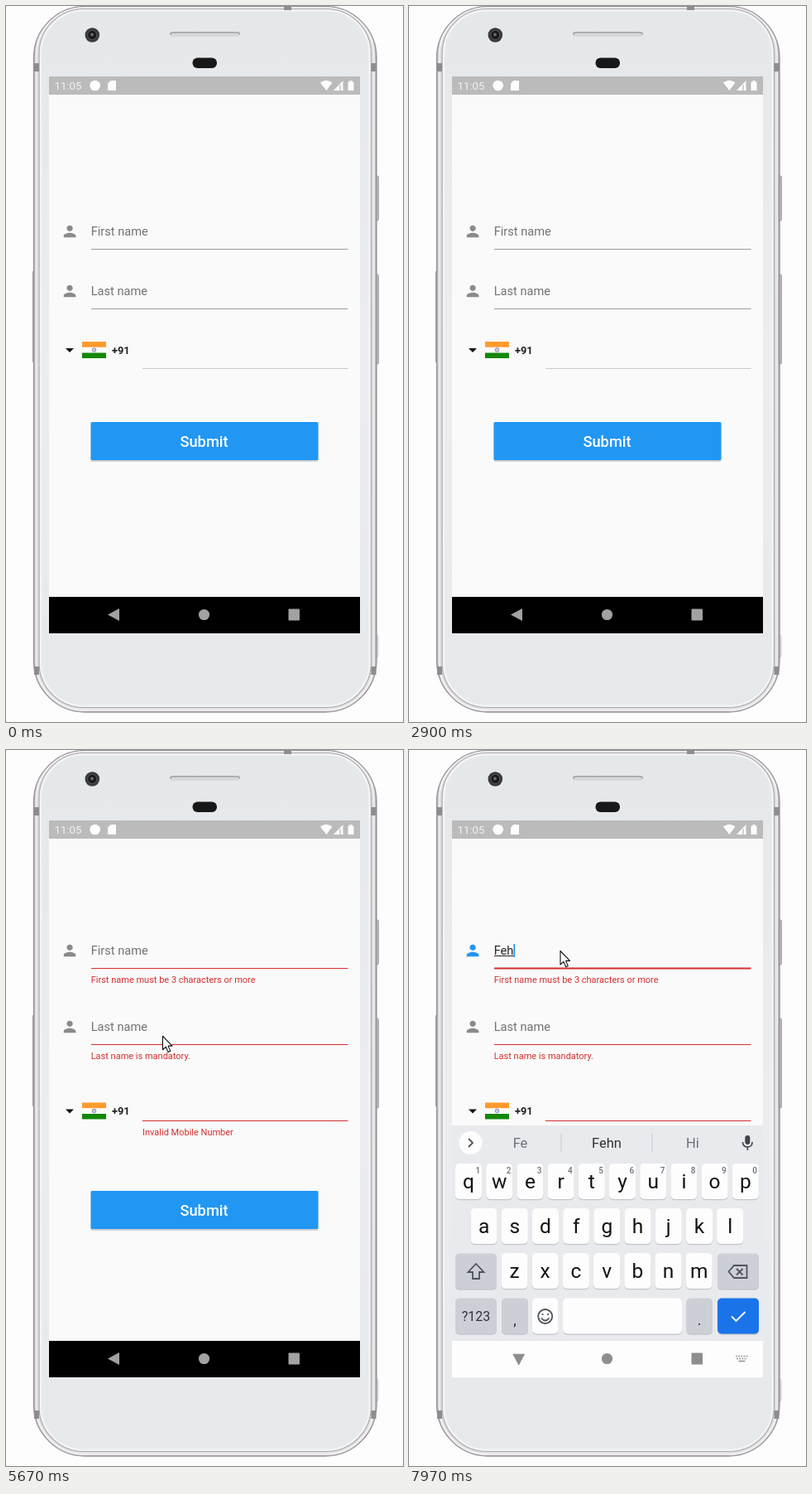
Animation, 480 px wide and 864 px high, one loop 8000 ms. Source, as an HTML page:

```html
<!DOCTYPE html>
<html lang="en">
<head>
<meta charset="utf-8">
<title>Form validation</title>
<style>
html, body { margin: 0; width: 100%; height: 100%; overflow: hidden; background: #fdfdfd; }
svg { display: block; width: 100vw; height: 100vh; }
text { font-family: Roboto, sans-serif; white-space: pre; }
.hint { font-size: 14.6px; fill: #727272; }
.error { font-size: 11px; fill: #d32f2f; }
.key { font-size: 24.5px; fill: #121212; text-anchor: middle; }
.word { font-size: 16.5px; text-anchor: middle; }
.line { fill: none; stroke: #50545a; stroke-width: 1.8; }
</style>
</head>
<body>
<svg viewBox="0 0 480 864" preserveAspectRatio="none">
  <defs>
    <linearGradient id="rim">
      <stop offset="0" stop-color="#b9b6b9"/><stop offset=".012" stop-color="#e2dfe2"/>
      <stop offset=".988" stop-color="#e2dfe2"/><stop offset="1" stop-color="#b0adb0"/>
    </linearGradient>
    <linearGradient id="body" x2="0" y2="1">
      <stop offset="0" stop-color="#e5e8eb"/><stop offset=".5" stop-color="#ebedf0"/>
      <stop offset="1" stop-color="#e6e9ec"/>
    </linearGradient>
    <clipPath id="screen"><rect x="52" y="107" width="376" height="606"/></clipPath>
    <path id="person" d="M12 12c2.21 0 4-1.79 4-4s-1.79-4-4-4-4 1.79-4 4 1.79 4 4 4zm0 2c-2.67 0-8 1.34-8 4v2h16v-2c0-2.66-5.33-4-8-4z"/>
  </defs>

  <!-- phone -->
  <g fill="#c2bfc2" stroke="#989598" stroke-width=".8">
    <rect x="446" y="205" width="4.5" height="54" rx="1.5"/>
    <rect x="446" y="324" width="4.5" height="108" rx="1.5"/>
    <rect x="446" y="759" width="4" height="27" rx="1.5" fill="#e4e2e4" stroke="#cdcacd"/>
    <rect x="32.3" y="320" width="3" height="110" rx="1"/>
  </g>
  <rect x="33.5" y=".5" width="414.5" height="851.5" rx="62" fill="url(#rim)" stroke="#949194" stroke-width="1.3"/>
  <rect x="36.5" y="2" width="408.5" height="847.5" rx="58" fill="none" stroke="#f4f2f4" stroke-width="1.6"/>
  <rect x="40" y="3.5" width="401.5" height="843" rx="54" fill="url(#body)" stroke="#aeabae" stroke-width="1.2"/>
  <rect x="42" y="5.5" width="397.5" height="839" rx="52" fill="none" stroke="#f3f4f6" stroke-width="2"/>
  <g fill="#8e8c8e">
    <rect x="34" y="69" width="6" height="10"/><rect x="441.5" y="69" width="6" height="10"/>
    <rect x="34" y="797" width="6" height="10"/><rect x="441.5" y="797" width="6" height="10"/>
    <rect x="336" y="0" width="9" height="5"/>
  </g>
  <circle cx="104.3" cy="35" r="8.8" fill="#3a3a3c"/>
  <circle cx="104.3" cy="35" r="5.5" fill="#18181a" stroke="#565658"/>
  <circle cx="104" cy="34.5" r="2" fill="#6a6a6c"/>
  <rect x="198.5" y="31" width="83.5" height="6" rx="3" fill="#d6d8da"/>
  <path d="M199 35V33.5Q199 32 201 32H280Q282 32 282 33.5V35" fill="none" stroke="#a2a2a4" stroke-width="1.5"/>
  <rect x="225.5" y="62.5" width="29.5" height="12.5" rx="6" fill="#181818"/>

  <!-- screen -->
  <rect x="52" y="85" width="376" height="628" fill="#fafafa"/>
  <rect x="52" y="85" width="376" height="22" fill="#bbbbbb"/>
  <text x="58.5" y="101" font-size="13.2" fill="#f2f2f2">11:05</text>
  <g fill="#fdfdfd">
    <circle cx="107.7" cy="96" r="6.3"/>
    <path d="M126.5 90H133V102H123V93.5Z"/>
    <path d="M380 92.5Q387.3 87 394.5 92.5L387.3 102Z"/>
    <path d="M396 102L407.5 90V102Z"/>
    <path d="M413.5 91.5H415.5V90H418.5V91.5H420.5V102H413.5Z"/>
  </g>
  <path d="M404 95V102" stroke="#bbb" stroke-width="1.2"/>

  <g clip-path="url(#screen)">
    <g id="form"></g>
    <g id="keyboard"></g>
  </g>

  <!-- navigation bar -->
  <rect x="52" y="713" width="376" height="44" fill="#000"/>
  <rect id="lightNav" x="52" y="713" width="376" height="44" fill="#fdfdfd"/>
  <g id="nav">
    <path id="back" d="M-9 .7L5 -6.8V8.2Z"/>
    <circle cx="239.5" cy="734.5" r="6.6"/>
    <rect x="341.5" y="727.5" width="13.5" height="14" rx="1"/>
  </g>
  <g id="imeIcon" fill="none" stroke-width="1.5">
    <path d="M395 731.5H410M396 734.5H409" stroke-dasharray="1.8 1.4"/><path d="M398.5 737.5H406.5"/>
  </g>
  <path id="mouse" d="M0 0V16.5L3.9 12.9L6.7 19.3L9.3 18.1L6.6 11.9H11.5Z" fill="#fff" stroke="#111" stroke-width="1.1" stroke-linejoin="round"/>
</svg>
<script>
const LOOP = 8000, SHOW_MOUSE = 4350, SUBMIT = 4580, FOCUS = 6380, KEYS_UP = 6680;
const TYPED = [7420, 7630, 7830], NAME = 'Feh';
const BLUE = '#2196f3', RED = '#d32f2f', GRAY = '#8a8a8a';

const $ = id => document.getElementById(id);
const clamp = v => Math.max(0, Math.min(1, v));
const ramp = (t, start, length) => clamp((t - start) / length);
const smooth = p => p * p * (3 - 2 * p);
const mix = (a, b, p) => a + (b - a) * p;
const show = (id, on) => $(id).setAttribute('visibility', on ? 'inherit' : 'hidden');
const shift = (id, x, y) => $(id).setAttribute('transform', `translate(${x} ${y})`);
const paint = (id, attrs) => Object.entries(attrs).forEach(([k, v]) => $(id).setAttribute(k, v));

// Form
const nameRow = (n, label, error) => `
  <g id="row${n}">
    <use id="icon${n}" href="#person" transform="translate(66.1 -11) scale(.914)"/>
    <text id="hint${n}" class="hint" x="102.7" y="4.8">${label}</text>
    <path id="line${n}" d="M103 21.5H413.5"/>
    <text id="error${n}" class="error" x="102.7">${error}</text>
  </g>`;
$('form').innerHTML =
  nameRow(1, 'First name', 'First name must be 3 characters or more') +
  nameRow(2, 'Last name', 'Last name is mandatory.') + `
  <g id="phone">
    <path d="M72 -2H82L77 3Z" fill="#111"/>
    <rect x="92" y="-10" width="29" height="20" fill="#fdfdfd"/>
    <rect x="92" y="-10" width="29" height="6.7" fill="#ff9a2e"/>
    <rect x="92" y="3.5" width="29" height="6.5" fill="#138808"/>
    <circle cx="106.5" cy="0" r="2.3" fill="#d0d0e0" stroke="#7777a4" stroke-width=".8"/>
    <text x="128" y="4.6" font-size="12.8" font-weight="700" fill="#202020">+91</text>
  </g>
  <path id="line3" d="M165 0H413.5"/>
  <text id="error3" class="error" x="165">Invalid Mobile Number</text>
  <g id="submit">
    <rect x="102.5" y="1.5" width="275" height="46.5" rx="2" fill="#cfcfcf"/>
    <rect x="102.5" y="0" width="275" height="46" rx="1.5" fill="${BLUE}"/>
    <text x="239.5" y="29.5" font-size="18.3" font-weight="500" fill="#fff" text-anchor="middle">Submit</text>
  </g>
  <text id="typed" class="hint" x="102.7" y="246.8" style="fill:#222"></text>
  <path id="composing" stroke="#222"/>
  <rect id="caret" y="234" width="1.8" height="16" fill="${BLUE}"/>`;

// Keyboard
const PITCH = 37.2;
const LIGHT = '#fdfdfd', DARK = '#cccfd5', INK = '#303236', SOFT = '#6c7076';
const box = (x, y, w, fill) =>
  `<rect x="${x}" y="${y + 1.2}" width="${w}" height="43" rx="5" fill="#c2c5ca"/>
   <rect x="${x}" y="${y}" width="${w}" height="43" rx="5" fill="${fill}"/>`;
const letters = (chars, x0, y) => [...chars].map((c, i) => {
  const x = x0 + i * PITCH;
  return box(x - 16, y, 32, LIGHT) + `<text class="key" x="${x}" y="${y + 30}">${c}</text>`;
}).join('');
const digits = [...'1234567890'].map((d, i) =>
  `<text x="${83.3 + i * PITCH}" y="511" font-size="10" font-weight="500" fill="${SOFT}" text-anchor="middle">${d}</text>`).join('');
const chevron = d => `<circle cx="74.5" cy="474" r="14" fill="${LIGHT}"/><path class="line" d="${d}"/>`;
const bar = x => `<path d="M${x} 463V485" stroke="#cccfd3" stroke-width="1.2"/>`;
const word = (x, s, fill) => `<text class="word" x="${x}" y="480" fill="${fill}">${s}</text>`;

$('keyboard').innerHTML = `
  <rect x="52" y="453" width="376" height="260" fill="#e8eaed"/>
  <g id="tools">
    ${chevron('M77 469L72 474L77 479')}
    <circle class="line" cx="122.5" cy="472" r="5"/><path class="line" d="M126 475.5L132 481.5"/>
    <path class="line" d="M173 467H186V475L180.5 481H173Q172 481 172 480V468Q172 467 173 467ZM186 475H180.5V481M175.5 474Q177 477 179.5 476M176 470.5V471.5M181.5 470.5V471.5"/>
    <text x="233" y="478.5" font-size="12.5" font-weight="900" letter-spacing=".6" fill="#50545a" text-anchor="middle">GIF</text>
    <path class="line" d="M282 467.5H294.5V482H282ZM285 471.5H291.5M285 475H291.5M285 478.5H289.5"/>
    <rect x="285" y="465" width="6.5" height="4" fill="#50545a"/>
    ${bar(321.5)}
    <path d="M349.5 474h0M355 474h0M360.5 474h0" stroke="#50545a" stroke-width="3.6" stroke-linecap="round"/>
  </g>
  <g id="words">
    ${chevron('M72 469L77 474L72 479')}
    ${word(134.5, 'Fe', SOFT)}${bar(184)}${word(239, 'Fehn', INK)}${bar(294)}${word(343, 'Hi', SOFT)}
  </g>
  <rect x="406.3" y="465" width="6" height="11" rx="3" fill="#404348"/>
  <path class="line" d="M403.5 473Q403.5 479 409.3 479T415 473M409.3 479V483"/>
  ${letters('qwertyuiop', 72, 499)}${digits}
  ${letters('asdfghjkl', 90.6, 553)}
  ${box(56, 607.5, 50, DARK)}${letters('zxcvbnm', 127.5, 607)}${box(373, 607.5, 50, DARK)}
  <path class="line" d="M81 620L90.5 630H85V638H77V630H71.5Z"/>
  <path class="line" d="M393 622H408.5V637H393L386.5 629.5ZM396 626L403.5 633.5M403.5 626L396 633.5"/>
  ${box(56, 661.5, 50, DARK)}${box(112, 661.5, 32, DARK)}${box(149, 661.5, 31.5, LIGHT)}
  ${box(186, 661.5, 144, LIGHT)}${box(335.5, 661.5, 31.5, DARK)}${box(373, 661.5, 50, '#1a73e8')}
  <text x="81" y="689" font-size="16" fill="${INK}" text-anchor="middle">?123</text>
  <text x="128" y="694" font-size="18" fill="${INK}" text-anchor="middle">,</text>
  <text x="351" y="694" font-size="18" fill="${INK}" text-anchor="middle">.</text>
  <circle class="line" cx="164.7" cy="683.5" r="8.5"/>
  <path class="line" d="M161.5 680V682M168 680V682M160 685.5Q164.7 691.5 169.5 685.5"/>
  <path d="M390 683.5L395.5 689L406.5 678" fill="none" stroke="#fff" stroke-width="1.9"/>`;

function drawForm(t) {
  const invalid = t >= SUBMIT, focused = t >= FOCUS;
  shift('row1', 0, invalid ? 242 : 272);
  shift('row2', 0, invalid ? 334 : 344);
  shift('phone', 0, invalid ? 435.5 : 415);
  shift('line3', 0, invalid ? 447.5 : 437.5);
  shift('submit', 0, invalid ? 532 : 502);

  const line = invalid ? RED : '#9c9c9c';
  paint('line1', { stroke: line, 'stroke-width': focused ? 1.8 : 1 });
  paint('line2', { stroke: line, 'stroke-width': 1 });
  paint('line3', { stroke: invalid ? line : '#c8c8c8', 'stroke-width': 1 });
  paint('icon1', { fill: focused ? BLUE : GRAY });
  paint('icon2', { fill: GRAY });

  const fade = smooth(ramp(t, SUBMIT, 167));
  const drop = mix(-3, 0, fade);
  paint('error1', { opacity: fade, y: 39 + drop });
  paint('error2', { opacity: fade, y: 39 + drop });
  paint('error3', { opacity: fade, y: 465 + drop });
}

function drawTyping(t) {
  const count = TYPED.filter(at => t >= at).length;
  $('typed').textContent = NAME.slice(0, count);
  show('hint1', !count);
  const width = count ? $('typed').getComputedTextLength() : 0;
  paint('composing', { d: `M103 248.5H${103 + width}` });
  show('composing', count > 0);

  const since = t - (count ? TYPED[count - 1] : FOCUS);
  paint('caret', { x: 102.7 + width });
  show('caret', t >= FOCUS && since % 1000 < 500);
  show('tools', !count);
  show('words', count > 0);
}

function drawKeyboard(t) {
  const up = ramp(t, KEYS_UP, 230), eased = 1 - (1 - up) ** 3;
  shift('keyboard', 0, 260 * (1 - eased));
  show('keyboard', up > 0);

  const light = ramp(t, KEYS_UP, 120);
  paint('lightNav', { opacity: light });
  const dim = ramp(t, FOCUS + 60, 120);
  const tone = light > .5 ? '#8e8e8e' : dim > .5 ? '#686868' : '#a2a2a2';
  paint('nav', { fill: tone });
  paint('imeIcon', { stroke: tone, opacity: dim });
  const turn = 270 * smooth(ramp(t, KEYS_UP + 100, 310));
  paint('back', { transform: `translate(132 733.8) rotate(${turn})` });
}

function drawMouse(t) {
  const enter = smooth(ramp(t, SHOW_MOUSE, 150));
  const travel = smooth(ramp(t, 5200, 800));
  shift('mouse', mix(mix(208, 200.5, enter), 183, travel), mix(mix(538, 521.5, enter), 242.5, travel));
  show('mouse', t >= SHOW_MOUSE);
}

function frame() {
  const t = performance.now() % LOOP;
  drawForm(t);
  drawTyping(t);
  drawKeyboard(t);
  drawMouse(t);
  requestAnimationFrame(frame);
}
frame();
</script>
</body>
</html>
```
